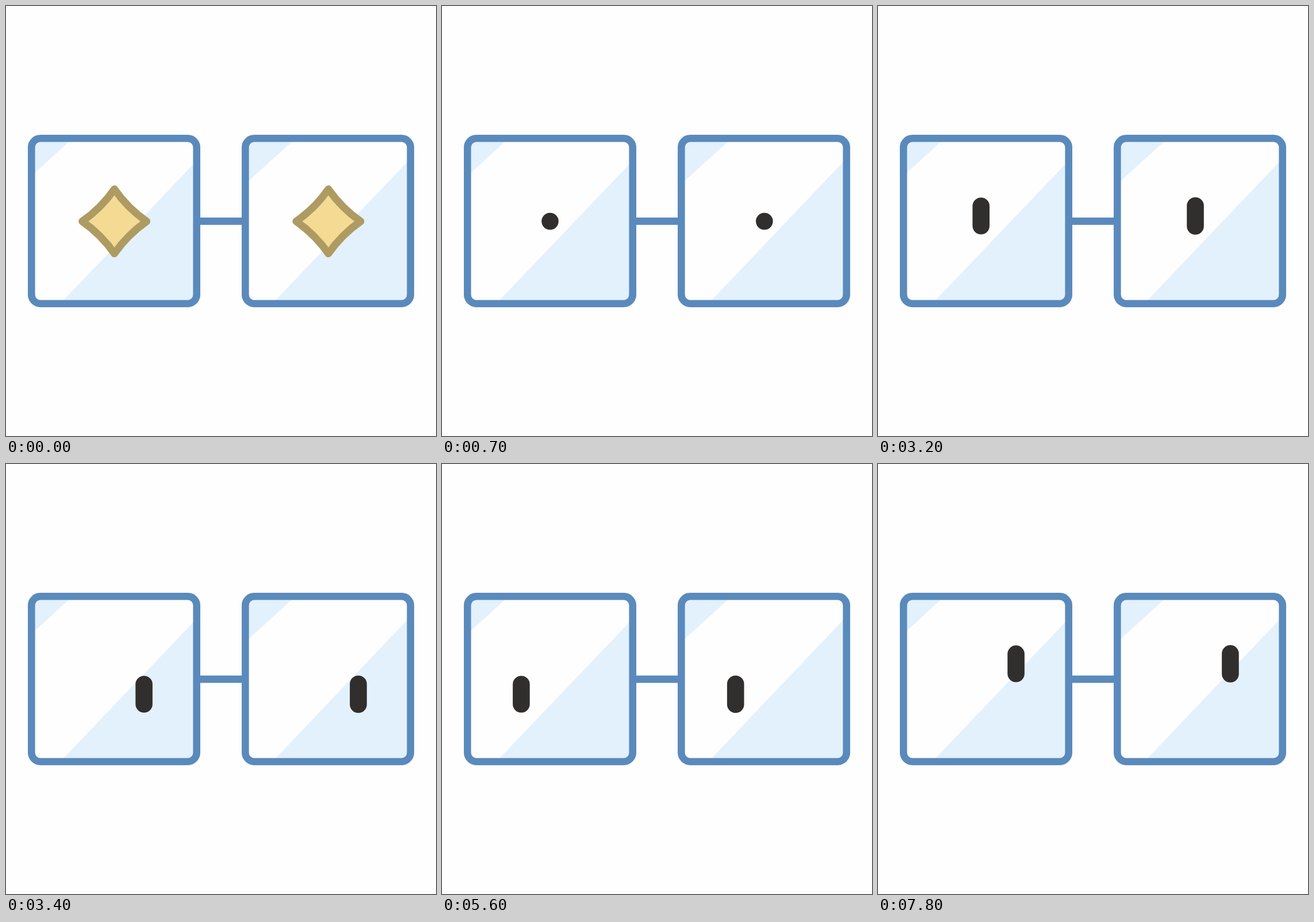
Write an HTML page that moves like this. It is 748x748 px and loops after 8000 ms.

```html
<!DOCTYPE html>
<html lang="en">
<head>
<meta charset="utf-8">
<title>Glasses</title>
<style>
  html, body { margin: 0; width: 100%; height: 100%; overflow: hidden; background: #fefefe; }
  svg { display: block; width: 100vw; height: 100vh; }
  .glare { fill: #e3f1fd; }
  .frame { fill: none; stroke: #5a8abc; stroke-width: 12.6; }
  .star { fill: #f5da94; stroke: #ad9b62; stroke-width: 13; stroke-linejoin: round; }
  .pupil { fill: #312e2e; }
</style>
</head>
<body>
<svg viewBox="0 0 748 748">
  <defs>
    <rect id="rim" class="frame" x="44.3" y="230.3" width="287.4" height="287.4" rx="15.5"/>
    <path id="sparkle" class="star" d="M0-56Q23-23 56 0Q23 23 0 56Q-23 23-56 0Q-23-23 0-56Z"/>
  </defs>
  <path class="glare" d="M46 232H114L46 294ZM330 271V516H96ZM418 232H502L418 308ZM702 267V516H465Z"/>
  <use href="#sparkle" class="eye-star"/>
  <use href="#sparkle" class="eye-star"/>
  <rect class="pupil" width="29.6" rx="14.8"/>
  <rect class="pupil" width="29.6" rx="14.8"/>
  <use href="#rim"/>
  <use href="#rim" x="372"/>
  <path class="frame" d="M336 374.4H412"/>
</svg>
<script>
  const LOOP = 8000, STEP = 100, EYE_GAP = 372.8;
  const stars = document.querySelectorAll('.eye-star');
  const pupils = document.querySelectorAll('.pupil');

  // Each glance takes three steps; dip bends its path downwards.
  const glances = [
    { start: 1000, x: 148.8, y: 347.6, dip: 0 },
    { start: 3200, x: 240.1, y: 400.5, dip: 0 },
    { start: 5400, x: 137.9, y: 400.5, dip: 1.9 },
    { start: 7600, x: 240.1, y: 347.6, dip: 0 },
  ];
  const clamp = v => Math.max(0, Math.min(1, v));
  const progress = (time, start, steps) => clamp(((time - start) / STEP + 1) / steps);

  function gaze(time) {
    let x = 188, y = 374.5;
    for (const g of glances) {
      if (time < g.start) break;
      const p = progress(time, g.start, 3);
      x += (g.x - x) * p;
      y += (g.y - y) * p + g.dip * Math.sin(Math.PI * p);
    }
    return { x, y };
  }

  function draw(now) {
    const time = Math.floor((now % LOOP) / STEP) * STEP;
    const starScale = 1 - progress(time, 500, 3);
    const stretch = progress(time, 800, 2);
    const { x, y } = gaze(time);

    stars.forEach((star, i) => {
      star.setAttribute('transform', `translate(${188.6 + i * 372.2} 374.6) scale(${starScale})`);
      star.style.display = starScale > 0 ? '' : 'none';
    });
    pupils.forEach((pupil, i) => {
      const height = 29.6 + (34.4 + i) * stretch;
      pupil.setAttribute('x', x - 14.8 + i * EYE_GAP);
      pupil.setAttribute('y', y - height / 2);
      pupil.setAttribute('height', height);
      pupil.style.display = time >= 700 ? '' : 'none';
    });
  }

  const began = performance.now();
  function tick() {
    draw(performance.now() - began);
    requestAnimationFrame(tick);
  }
  tick();
</script>
</body>
</html>
```
